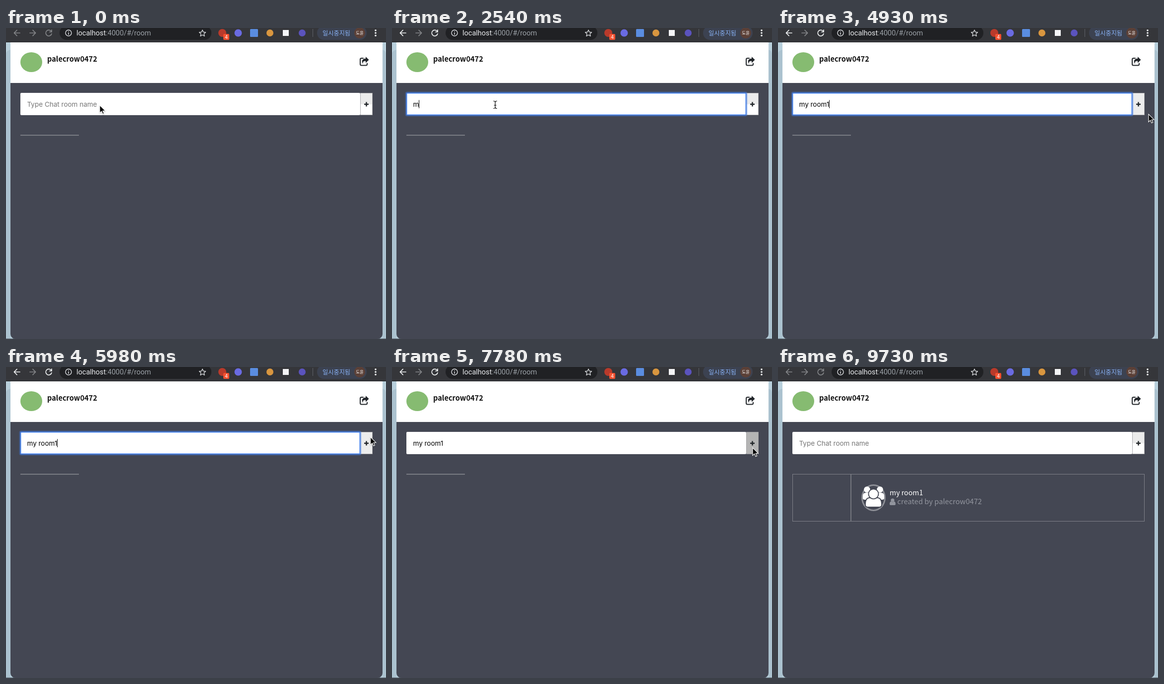
Write an HTML page that moves like this. It is 766x628 px and loops after 9830 ms.

```html
<!DOCTYPE html>
<html lang="en">
<head>
<meta charset="utf-8">
<title>Chat rooms</title>
<style>
  html, body { margin: 0; width: 100%; height: 100%; overflow: hidden; background: #444753; }
  svg { display: block; width: 100vw; height: 100vh; }
  text { white-space: pre; }
  .ui { font-family: Inter, sans-serif; font-size: 13.5px; }
  .kr { font-family: "Noto Sans CJK KR", "Noto Sans CJK", "Noto Sans", sans-serif; }
  .line { fill: none; stroke-linecap: round; stroke-linejoin: round; }
</style>
</head>
<body>
<svg viewBox="0 0 766 628" xmlns="http://www.w3.org/2000/svg">
  <defs>
    <linearGradient id="idle" x2="0" y2="1">
      <stop offset=".5" stop-color="#ebebeb"/><stop offset=".52" stop-color="#fff"/>
    </linearGradient>
    <filter id="soft" x="-50%" y="-50%" width="200%" height="200%">
      <feDropShadow dx="0" dy="1" stdDeviation="1" flood-opacity=".35"/>
    </filter>
  </defs>

  <!-- page -->
  <rect width="766" height="628" fill="#b8cfdb"/>
  <path d="M0 628V52Q1 45 9 44V628ZM766 628V52Q765 45 759 44V628Z" fill="#abc2cf"/>
  <path d="M0 627.5H766" stroke="#59646e"/>
  <path d="M9 111H759V618a10 10 0 0 1-10 10H19a10 10 0 0 1-10-10Z" fill="#444753"/>
  <rect x="9" y="28" width="750" height="83" fill="#fff"/>

  <!-- browser bar -->
  <rect width="766" height="28" fill="#35363a"/>
  <rect y="28" width="766" height="1" fill="#292a2d"/>
  <rect x="108" y="-4" width="306" height="28" rx="14" fill="#202124"/>
  <g class="line" stroke-width="1.7">
    <path id="back" d="M28 10H16.5M22 4.3L16.3 10L22 15.7"/>
    <path d="M48 10H59.5M54 4.3L59.7 10L54 15.7" stroke="#85878a"/>
    <path id="reload" d="M91 6.5A6 6 0 1 0 92 11.5M92 3.8V8H87.8"/>
    <path d="M396 4l1.9 4.2 4.6.5-3.4 3.1 1 4.5-4.1-2.3-4.1 2.3 1-4.5-3.4-3.1 4.6-.5Z" stroke="#d5d7da" stroke-width="1.4"/>
    <circle cx="126" cy="10" r="6" stroke="#dfe1e5" stroke-width="1.4"/>
    <path d="M126 9.8V13M126 7.1V7.2" stroke="#dfe1e5" stroke-width="1.5"/>
  </g>
  <text x="142" y="15" font-family="Roboto, sans-serif" font-size="14.5" fill="#e8eaed">localhost<tspan fill="#9aa0a6">:4000/#/room</tspan></text>
  <circle cx="436" cy="10" r="8" fill="#b93a2b"/>
  <rect x="438" y="12" width="12" height="12" rx="2" fill="#f4502f"/>
  <text x="444" y="21.8" font-family="Roboto, sans-serif" font-size="10" text-anchor="middle" fill="#fff">4</text>
  <circle cx="468" cy="10" r="7.5" fill="#6a6be2"/>
  <rect x="492" y="2" width="16" height="16" rx="1.5" fill="#5a8de0"/>
  <circle cx="532" cy="10" r="7" fill="#d9963f"/>
  <rect x="558" y="4" width="12" height="12" fill="#f4f4f6"/>
  <circle cx="597" cy="10" r="7" fill="#5b53bd"/>
  <path d="M618.5 2V18" stroke="#5f6368"/>
  <rect x="627" y="-4" width="100" height="28" rx="14" fill="#3c4251"/>
  <text class="kr" x="638" y="14.5" font-size="12.2" fill="#8ab4f8">일시중지됨</text>
  <circle cx="713" cy="10" r="11" fill="#5b4037"/>
  <text class="kr" x="713" y="13" font-size="8.5" text-anchor="middle" fill="#fff">도윤</text>
  <g fill="#f1f3f4">
    <circle cx="745" cy="4.7" r="1.8"/><circle cx="745" cy="10" r="1.8"/><circle cx="745" cy="15.3" r="1.8"/>
  </g>

  <!-- header -->
  <ellipse cx="51" cy="69" rx="22" ry="20" fill="#86bb71"/>
  <text class="kr user" x="83" y="68" font-size="14.6" font-weight="700" fill="#111"></text>
  <path class="line" d="M720 61H716.5Q714 61 714 63.5V73Q714 75.5 716.5 75.5H725.5Q728 75.5 728 73V71.5" stroke="#212529" stroke-width="2"/>
  <path d="M725 58L731.5 64.2L725 70.4V66.8C720.5 66.6 719 68.3 719.8 72.5C716 67.5 717.5 62 725 61.7Z" fill="#212529"/>

  <!-- form -->
  <rect x="29" y="131" width="685" height="45" rx="2" fill="#fff"/>
  <g id="button">
    <rect id="face" x="714" y="131" width="25" height="45"/>
    <path d="M714.5 131V176M739 131.5H714M714 175.5H739M738.5 131V176" stroke="#9b9b9f" stroke-width=".8"/>
    <path d="M722 154H731M726.5 149.5V158.5" stroke="#212529" stroke-width="2.4"/>
  </g>
  <g id="ring" fill="none">
    <rect x="27.5" y="129.5" width="688" height="48" rx="3" stroke="#3b78e7" stroke-opacity=".4" stroke-width="2"/>
    <rect x="29.5" y="131.5" width="684" height="44" rx="1.5" stroke="#4a86f0" stroke-width="2"/>
  </g>
  <text id="hint" class="ui" x="42.5" y="159" fill="#757575">Type Chat room name</text>
  <text id="entry" class="ui" x="42.5" y="159" fill="#000"></text>
  <rect id="caret" y="145.5" width="1" height="16.5" fill="#000"/>

  <!-- list -->
  <path id="rule" d="M29 216.5H147" stroke="#8c8e95" stroke-width="1.6"/>
  <g id="room">
    <rect x="29.5" y="216.5" width="709" height="95" fill="none" stroke="#80828a"/>
    <path d="M147 216V312" stroke="#80828a" stroke-width="1.6"/>
    <ellipse cx="192.5" cy="264" rx="23" ry="25.5" fill="none" stroke="#8d8f96" stroke-width="3"/>
    <g fill="#fff">
      <circle cx="179.5" cy="247.5" r="6.3"/><circle cx="205.5" cy="247.5" r="6.3"/>
      <path d="M171 265V260Q171 254 177 254H208Q214 254 214 260V265Q214 268 210 268H175Q171 268 171 265Z"/>
      <g stroke="#444753" stroke-width="1.8">
        <path d="M176 278Q176 264 185 264H200Q209 264 209 278Q209 283 204 283H181Q176 283 176 278Z"/>
        <circle cx="192.5" cy="256.3" r="10"/>
      </g>
    </g>
    <text class="kr" x="225" y="258.5" font-size="14.2" fill="#fff">my room1</text>
    <g fill="#92959e">
      <circle cx="231" cy="269" r="3.6"/>
      <path d="M225 277Q225 271.5 228.3 271.5Q231 274 233.7 271.5Q237 271.5 237 277Q237 279 235 279H227Q225 279 225 277Z"/>
      <text class="kr" x="240.5" y="277" font-size="14.7">created by <tspan class="user"></tspan></text>
    </g>
  </g>

  <!-- pointers -->
  <path id="arrow" d="M0 0V15.6L3.6 12.2L6.1 17.8L8.6 16.7L6.2 11.2H11Z" fill="#000" stroke="#fff" stroke-width="1.1" filter="url(#soft)"/>
  <g id="beam" class="line">
    <path d="M-3.2 -7.5Q0 -7.5 0 -5Q0 -7.5 3.2 -7.5M0 -5V5M-3.2 7.5Q0 7.5 0 5Q0 7.5 3.2 7.5M-2 1H2" stroke="#000" stroke-width="1.2"/>
  </g>
</svg>
<script>
const LOOP = 9830;
const el = id => document.getElementById(id);
const show = (id, on) => el(id).setAttribute('display', on ? 'inline' : 'none');
document.querySelectorAll('.user').forEach(n => n.textContent = 'palecrow0472');

// Ticks at which things happen, one tick being about 150 ms
const FOCUS = 4, PRESS = 50, CREATE = 53, LEAVE = 59, GONE = 63, BLUR = 65;

// Pointer waypoints: tick, x, y
const route = [
  [0, 189, 156], [3, 206, 153], [4, 207, 154], [5, 207, 154], [6, 208, 155], [27, 208, 155],
  [28, 216, 154], [29, 310, 150], [30, 520, 150], [31, 728, 164], [32, 754, 177],
  [33, 747, 174], [34, 739, 172], [37, 731, 137], [41, 736, 143], [46, 734, 148],
  [48, 727, 163], [58, 727, 163], [59, 728, 220], [62, 739, 588]
];

// Typed text: tick, number of letters
const typing = [[17, 1], [18, 2], [19, 3], [20, 4], [21, 6], [22, 7], [25, 8]];

function tickAt(t) {
  const lag = t < 590 ? 0 : t < 2980 ? 10 : 20;
  return Math.min(BLUR, Math.floor((t + lag) / 150));
}

function pointAt(k) {
  let i = 0;
  while (i < route.length - 2 && route[i + 1][0] <= k) i++;
  const [a, x, y] = route[i], [b, u, v] = route[i + 1];
  const p = Math.min(1, (k - a) / (b - a));
  return [x + (u - x) * p, y + (v - y) * p];
}

function lettersAt(k) {
  if (k >= CREATE) return 0;
  return typing.reduce((n, [at, count]) => k >= at ? count : n, 0);
}

function caretOn(k) {
  if (k < FOCUS || k >= PRESS) return false;
  if (k < 17) return k < 8 || (k >= 12 && k < 15);
  if (k < 28) return true;
  return (k * 150 - 20 - 3680) % 1000 < 500;
}

function draw(t) {
  const k = tickAt(t);
  const active = k >= FOCUS && k < BLUR;
  const tint = active ? '#f1f3f4' : '#85878a';
  el('back').setAttribute('stroke', tint);
  el('reload').setAttribute('stroke', tint);

  const count = lettersAt(k);
  el('entry').textContent = 'my room1'.slice(0, count);
  show('hint', !count);
  show('ring', k >= FOCUS && k < PRESS);
  show('caret', caretOn(k));
  const width = count ? el('entry').getComputedTextLength() : 0;
  el('caret').setAttribute('x', Math.round(42.6 + width));

  const pressed = k >= PRESS && k < CREATE;
  const hover = k >= 31 && k < LEAVE;
  el('face').setAttribute('fill', pressed ? '#b4b4b4' : hover ? '#ededed' : 'url(#idle)');

  show('room', k >= CREATE);
  show('rule', k < CREATE);

  const [x, y] = pointAt(k);
  const beam = k >= FOCUS && k < 31;
  show('beam', beam);
  show('arrow', !beam && k < GONE);
  el(beam ? 'beam' : 'arrow').setAttribute('transform', `translate(${x} ${y})`);
}

const start = performance.now();
function loop(now) {
  draw(Math.max(0, now - start) % LOOP);
  requestAnimationFrame(loop);
}
draw(0);
requestAnimationFrame(loop);
</script>
</body>
</html>
```
